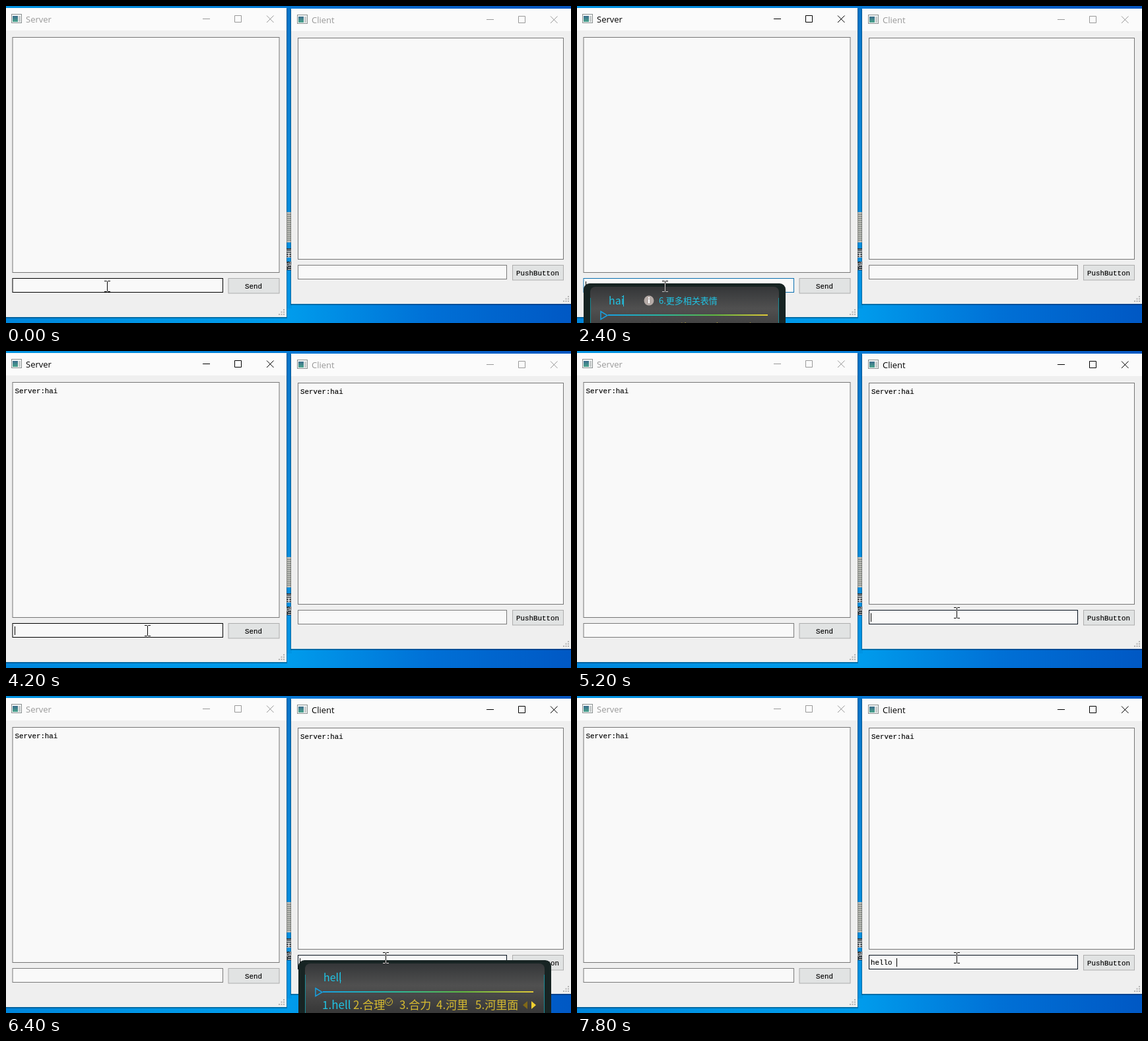
Write an HTML page that moves like this. It is 856 px wide and 480 px high and loops after 8 s.

```html
<!DOCTYPE html>
<html lang="en">
<head>
<meta charset="utf-8">
<title>Server and client chat</title>
<style>
  html, body { margin: 0; width: 100%; height: 100%; overflow: hidden; background: #0078d7; }
  svg { display: block; width: 856px; height: 480px; }
  text { white-space: pre; }
  .title { font: 13px "Open Sans", sans-serif; }
  .mono { font: 10.8px "Liberation Mono", monospace; stroke: #000; stroke-width: .15px; }
  .ime { font: 17px "Noto Sans CJK SC", "Noto Sans CJK", sans-serif; }
  .small { font-size: 13px; }
  .typed { font-size: 16px; font-weight: 500; }
  .pointer { mix-blend-mode: difference; }
</style>
</head>
<body>
<svg id="stage" viewBox="0 0 856 480"></svg>
<script>
const LOOP = 8000, STEP = 200, CHAR = 6.48, BLINK = 530;
const stage = document.getElementById('stage');

const rect = (x, y, w, h, fill, more = '') =>
  `<rect x="${x}" y="${y}" width="${w}" height="${h}" fill="${fill}" ${more}/>`;
const box = (x, y, w, h, fill, stroke) =>
  rect(x + .5, y + .5, w - 1, h - 1, fill, `stroke="${stroke}"`);
const path = (d, stroke, more = '') => `<path d="${d}" fill="none" stroke="${stroke}" ${more}/>`;
const text = (x, y, kind, str, fill = '#000', more = '') =>
  `<text x="${x}" y="${y}" class="${kind}" fill="${fill}" ${more}>${str}</text>`;
const gradient = (id, colors, x2, y2, more = '') =>
  `<linearGradient id="${id}" x1="0" y1="0" x2="${x2}" y2="${y2}" ${more}>` +
  colors.map((c, i) => `<stop offset="${i / (colors.length - 1)}" stop-color="${c}"/>`).join('') +
  '</linearGradient>';

const defs = '<defs>' +
  gradient('sky', ['#0086dc', '#0096e6', '#009cec', '#0070d6', '#0058c4'], 1, 0) +
  gradient('topSky', ['#0094e2', '#0088da', '#0078d4', '#0062c8', '#0056c0'], 1, 0) +
  gradient('gap', ['#0874c8', '#0a88d8', '#0094e4'], 0, 1) +
  gradient('icon', ['#3c6c8c', '#4aa48c'], 0, 1) +
  gradient('panel', ['#343638', '#505050', '#3c3c3c', '#2a2c2c'], 0, 1) +
  gradient('beam', ['#18a0e0', '#28b8a0', '#60b840', '#e0c838'], 1, 0) +
  '</defs>';

function desktop() {
  let lines = '';
  for (let y = 315; y < 357; y += 3) lines += `M426 ${y + .5}h6`;
  return rect(0, 0, 856, 480, 'url(#sky)') + rect(0, 0, 856, 6, 'url(#topSky)') +
    rect(424, 3, 9, 455, 'url(#gap)') +
    rect(425, 312, 8, 46, '#bcbcb6') + path(lines, '#77807c') +
    rect(425, 367, 8, 14, '#1c2830') + rect(425, 387, 8, 13, '#1c2830') +
    text(422, 379, 'ime small', '量', '#fff') + text(422, 398, 'ime small', '档', '#fff');
}

function titleBar(x, y, w, name, active, iconX, minX) {
  const ink = active ? '#000' : '#999';
  const mid = y + 16.5;
  return rect(x, y, w, 34, '#fbfbfb') +
    box(iconX, y + 9, 16, 14, '#f4f6f6', '#8a9090') +
    rect(iconX + 2, y + 12, 8, 9, 'url(#icon)') + rect(iconX + 11, y + 12, 3, 9, '#c8cccc') +
    text(iconX + 22, y + 22, 'title', name, ink) +
    path(`M${minX} ${mid}h11 M${minX + 48.5} ${mid - 5}h10v10h-10z ` +
      `M${minX + 97} ${mid - 5}l10.5 10.5m0 -10.5l-10.5 10.5`, ink);
}

function grip(x, y) {
  let dots = '';
  for (let i = 0; i < 3; i++)
    for (let j = 0; j <= i; j++) dots += rect(x - j * 3.5, y - (2 - i) * 3.5, 2, 2, '#b4b4b4');
  return dots;
}

function chatWindow(o) {
  const { x, y, w, h, name, active, left, width, listY, listH, editY, editW, log, field, border, caret } = o;
  const buttonX = left + width - 78;
  const caretX = Math.round(left + 3 + field.length * CHAR) + .5;
  return rect(x - 1, y + 1, w + 2, h + 1, '#000', 'opacity=".28"') +
    rect(x, y, w, h, '#efefef') +
    titleBar(x, y, w, name, active, o.iconX, o.minX) +
    box(left, listY, width, listH, '#f9f9f9', '#767676') +
    text(left + 4, listY + 17, 'mono', log) +
    box(left, editY, editW, 22, '#f9f9f9', border) +
    text(left + 3, editY + 15, 'mono', field) +
    (caret ? path(`M${caretX} ${editY + 5}v13`, '#000') : '') +
    box(buttonX, editY, 78, 23.5, '#e1e3e3', '#adadad') +
    text(buttonX + 38.5, editY + 16, 'mono', o.button, '#000', 'text-anchor="middle"') +
    grip(x + w - 5, y + h - 5);
}

function popup(x, y, w, typed, caretX, extra, words) {
  const cyan = '#20c4e4';
  let out = rect(x, y, w, 100, '#172423', 'rx="9"') +
    rect(x + 10, y + 5, w - 20, 100, 'url(#panel)', 'rx="8"') +
    path(`M${x + 10.5} ${y + 22}V480M${x + w - 10.5} ${y + 22}V480`, '#1c8c98') +
    text(x + 38, y + 32, 'ime typed', typed, cyan) +
    path(`M${x + caretX + .5} ${y + 18}v17`, cyan) +
    rect(x + 37, y + 47, w - 64, 2, 'url(#beam)') +
    path(`M${x + 26} ${y + 42.5}l10 6l-10 6z`, '#18a0e0', 'stroke-width="1.5"');
  words.forEach(([dx, word], i) => {
    out += text(x + dx, y + 74, 'ime', `${i + 1}.${word}`, i ? '#d8bc30' : cyan);
  });
  return out + extra;
}

const hint = `<circle cx="109" cy="446" r="7.5" fill="#b4aaa6"/>` +
  rect(108, 444, 2, 6, '#fff') + rect(108, 441, 2, 2, '#fff') +
  text(124, 451, 'ime small', '6.更多相关表情', '#20c4e4');

const pager = '<circle cx="580" cy="463" r="5.5" fill="none" stroke="#d8bc30"/>' +
  path('M577 463l2.5 2.5l4 -5', '#d8bc30') +
  '<path d="M790 462v12l-7 -6z" fill="#806818"/><path d="M796 462v12l7 -6z" fill="#f0d030"/>';

// Latest value whose start time has passed.
const at = (t, list) => list.reduce((v, [start, value]) => t >= start ? value : v, list[0][1]);

const moves = [[0, 153, 424], [600, 133, 424], [3600, 133, 424], [4200, 214, 423], [5000, 575, 396], [LOOP, 575, 396]];

function pointer(t) {
  const i = moves.findIndex(m => m[0] > t);
  const [t0, x0, y0] = moves[i - 1], [t1, x1, y1] = moves[i];
  const k = (t - t0) / (t1 - t0);
  const x = Math.round(x0 + (x1 - x0) * k), y = Math.round(y0 + (y1 - y0) * k);
  const overEdit = (x < 329 && y > 411) || (x > 442 && x < 759 && y > 391);
  return overEdit
    ? path(`M${x - 4} ${y - 7.5}h3.5l1 1l1 -1h3.5M${x + .5} ${y - 7}v15M${x - 4} ${y + 8.5}h3.5l1 -1l1 1h3.5`,
      '#fff', 'class="pointer"')
    : `<path d="M${x} ${y}v16l4 -4l3 6l2 -1l-3 -6h6z" fill="#fff" stroke="#000"/>`;
}

function draw(t) {
  const serverActive = t >= 800 && t < 4800, clientActive = t >= 4800;
  const serverTyping = at(t, [[0, ''], [1800, 'h'], [2000, 'ha'], [2200, 'hai'], [2600, '']]);
  const clientTyping = at(t, [[0, ''], [6000, 'h'], [6200, 'he'], [6400, 'hell'], [6600, 'hello'], [7000, '']]);
  const focused = at(t, [[0, 0], [800, 800], [2400, 2470], [3700, 3700], [4800, 5000], [6000, 6000], [6400, 6400], [7000, 7000], [7400, 7400]]);
  const blinkOn = Math.floor(Math.max(0, t - focused) / BLINK) % 2 === 0;
  const log = t >= 3800 ? 'Server:hai' : '';

  let out = defs + desktop() + chatWindow({
    x: 0, y: 3, w: 425, h: 468, name: 'Server', active: serverActive, iconX: 8, minX: 298,
    left: 9.5, width: 405, listY: 47, listH: 357, editY: 412, editW: 319.5, button: 'Send', log,
    field: t >= 2600 && t < 3800 ? 'hai' : '', caret: serverActive && blinkOn,
    border: at(t, [[0, '#000'], [800, '#0a1a3a'], [1800, '#0a70b0'], [3800, '#000'], [4400, '#7a7a7a']])
  }) + chatWindow({
    x: 432, y: 4, w: 424, h: 447, name: 'Client', active: clientActive, iconX: 441, minX: 728,
    left: 442, width: 403, listY: 48, listH: 336, editY: 392, editW: 317, button: 'PushButton', log,
    field: at(t, [[0, ''], [7000, 'hello'], [7400, 'hello ']]), caret: clientActive && blinkOn,
    border: clientActive ? '#05101c' : '#7a7a7a'
  });

  if (serverTyping) {
    const done = serverTyping === 'hai';
    out += popup(10, 420, 306, serverTyping, 38 + [9.5, 19, 22][serverTyping.length - 1],
      done ? hint : '', [[36, serverTyping], [84, '还'], [132, '海'], [180, '害'], [228, '嗨']]);
  }
  if (clientTyping) {
    out += popup(443, 400, 383, clientTyping, 37 + [0, 10, 18, 0, 26, 36][clientTyping.length],
      pager, [[36, clientTyping], [83, '合理'], [153, '合力'], [209, '河里'], [268, '河里面']]);
  }
  stage.innerHTML = out + pointer(t);
}

let shown = -1;
const origin = performance.now();
function tick() {
  const t = Math.floor((performance.now() - origin) % LOOP / STEP) * STEP;
  if (t !== shown) draw(shown = t);
  requestAnimationFrame(tick);
}
tick();
</script>
</body>
</html>
```
